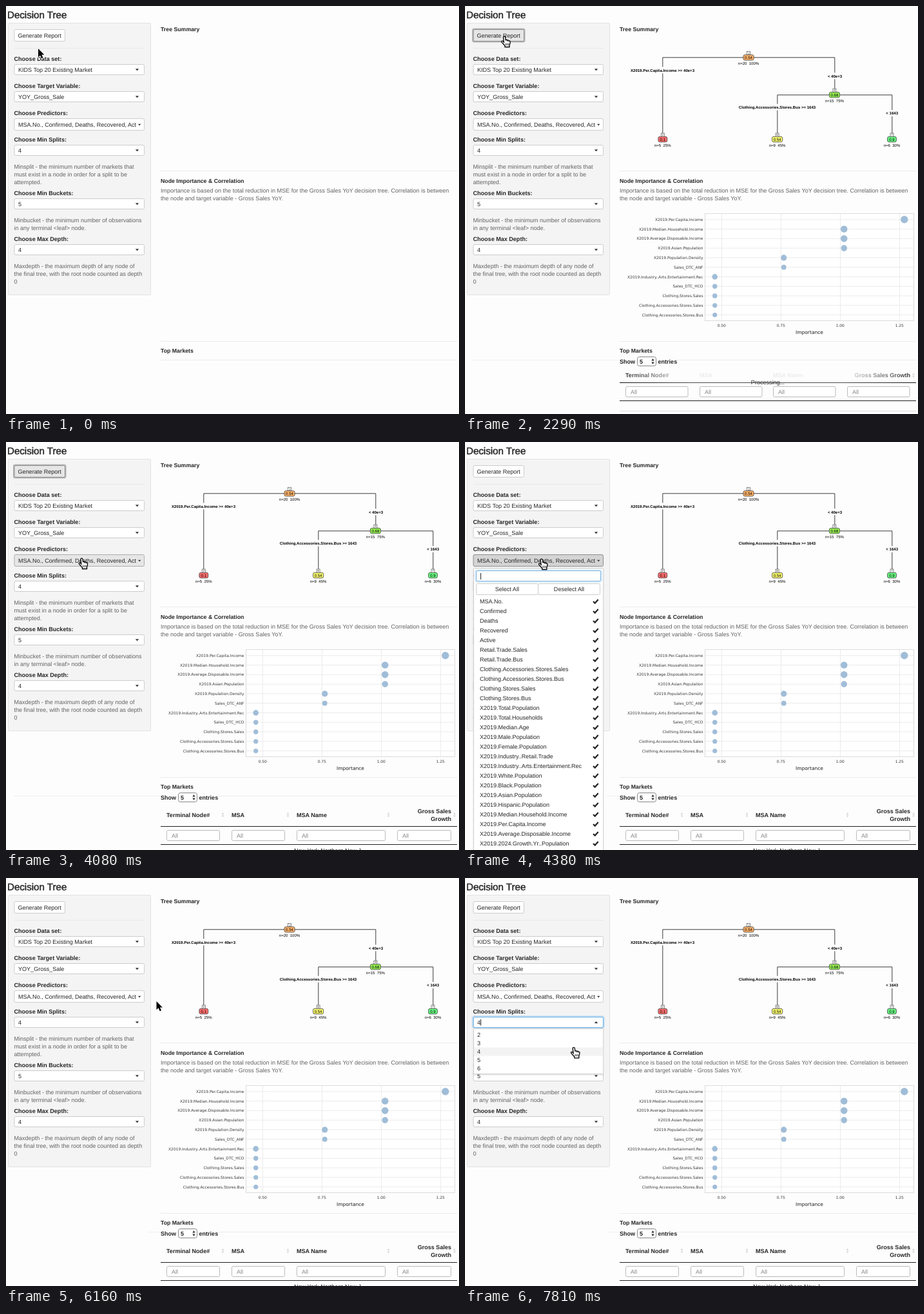
Recreate the animation shown at these times as an HTML page. Size 703 px wide and 632 px high, loop 8000 ms.

```html
<!DOCTYPE html>
<html lang="en">
<head>
<meta charset="utf-8">
<title>Decision Tree</title>
<style>
  html, body { margin: 0; width: 100%; height: 100%; overflow: hidden; background: #fdfdfd; }
  svg { display: block; position: absolute; left: 0; top: 0; }
  text { font: 9.05px "Liberation Sans", Arial, sans-serif; fill: #262626; white-space: pre; text-rendering: geometricPrecision; }
  .b { font-weight: bold; }
  .h { font-weight: bold; font-size: 8.75px; }
  .title { font-size: 15.1px; stroke: #262626; stroke-width: .45; }
  .help { fill: #636363; }
  .all { fill: #888; }
  .item { font-size: 9px; }
  .tree { font-size: 6.05px; fill: #000; }
  .cond { font-size: 6.05px; font-weight: bold; fill: #000; }
  .num { font-size: 4px; fill: #000; }
  .plot { font: 5.93px "DejaVu Sans", Verdana, sans-serif; fill: #3a3a3a; }
  .axis { font-size: 7.5px; fill: #1c1c1c; }
  .mid { text-anchor: middle; }
  .end { text-anchor: end; }
</style>
</head>
<body>
<svg id="stage" width="703" height="632" viewBox="0 0 703 632"></svg>
<script>
const text = (x, y, s, cls = '', extra = '') =>
  `<text x="${x}" y="${y}" class="${cls}" ${extra}>${s.replace(/&/g, '&amp;').replace(/</g, '&lt;')}</text>`;
const rect = (x, y, w, h, fill, stroke = 'none', rx = 0, extra = '') =>
  `<rect x="${x}" y="${y}" width="${w}" height="${h}" rx="${rx}" fill="${fill}" stroke="${stroke}" ${extra}/>`;
const path = (d, stroke, fill = 'none', extra = '') => `<path d="${d}" stroke="${stroke}" fill="${fill}" ${extra}/>`;
const line = (x, y, x2, color = '#ebebeb') => path(`M${x} ${y}H${x2}`, color);
const group = (id, ...parts) => `<g id="${id}">${parts.join('')}</g>`;
const each = (list, fn) => list.map(fn).join('');

const LEFT = 13, WIDTH = 201.5;
const caret = (x, y, w = 2.7) => path(`M${x - w} ${y}h${2 * w}l${-w} ${w * 1.1}z`, 'none', '#333');
const glow = (x, y, w, h) =>
  rect(x - 1, y - 1, w + 2, h + 2, 'none', '#66afe9', 3, 'stroke-width="3" opacity=".3"') +
  rect(x, y, w, h, 'none', '#66afe9', 2);
const popup = (y, h) => rect(LEFT - .5, y + .5, WIDTH + 1, h + 2, '#000', 'none', 2, 'opacity=".07"') +
  rect(LEFT + .3, y, WIDTH, h, '#fff', '#ccc', 1);

// Sidebar
const field = (label, y, value) =>
  text(12.5, y - 5.5, label, 'b') + rect(LEFT, y, WIDTH, 16, '#fff', '#ccc', 2) +
  text(19, y + 11.4, value);
const help = (y, ...rows) => each(rows, (s, i) => text(12.5, y + i * 12, s, 'help'));

const sidebar = [
  text(2, 19, 'Decision Tree', 'title'),
  rect(3.5, 26.5, 221, 421, '#f4f4f4', '#e2e2e2', 1),
  rect(LEFT - 1, 35.5, 80.5, 20, 'none', '#b5b5b5', 2, 'id="ring" stroke-width="2"'),
  rect(LEFT, 36.5, 78.5, 18, '#fff', '#ccc', 2, 'id="report"'),
  text(18.5, 49.2, 'Generate Report'),
  line(13, 65.5, 215, '#e9e9e9'),
  field('Choose Data set:', 90.5, 'KIDS Top 20 Existing Market'), caret(203.5, 97.2),
  field('Choose Target Variable:', 132.5, 'YOY_Gross_Sale'), caret(203.5, 139.2),
  text(12.5, 169, 'Choose Predictors:', 'b'),
  rect(LEFT, 174.5, WIDTH, 18, '#fff', '#ccc', 2, 'id="picker"'),
  text(19, 187, 'MSA.No., Confirmed, Deaths, Recovered, Act'), caret(207.2, 182.8, 2.2),
  field('Choose Min Splits:', 215.5, '4'), group('splitArrow', caret(203.5, 222.2)),
  help(252, 'Minsplit - the minimum number of markets that', 'must exist in a node in order for a split to be', 'attempted.'),
  field('Choose Min Buckets:', 298.5, '5'), caret(203.5, 305.2),
  help(335, 'Minbucket - the minimum number of observations', 'in any terminal <leaf> node.'),
  field('Choose Max Depth:', 369.5, '4'), caret(203.5, 376.2),
  help(406, 'Maxdepth - the maximum depth of any node of', 'the final tree, with the root node counted as depth', '0'),
].join('');

const headings = [
  text(240, 39, 'Tree Summary', 'h'),
  line(240, 255.5, 700),
  text(240, 274, 'Node Importance & Correlation', 'h'),
  text(240, 289, 'Importance is based on the total reduction in MSE for the Gross Sales YoY decision tree. Correlation is between', 'help'),
  text(240, 301, 'the node and target variable - Gross Sales YoY.', 'help'),
  line(240, 519.5, 700),
  text(240, 537, 'Top Markets', 'h'),
  line(240, 548.5, 700),
].join('');

// Tree
const node = (x, y, id, value, count, fill) => {
  const w = 7 + value.length * 2.3;
  return rect(x - 2.5, y - 9.5, 5, 5.5, '#fff', '#555', 0, 'stroke-width=".7"') + text(x, y - 5.3, id, 'num mid') +
    rect(x - w / 2, y - 4.2, w, 8.4, fill, '#444', 2.5, 'stroke-width=".8"') +
    text(x, y + 2.2, value, 'tree mid') + text(x, y + 11.5, count, 'tree mid');
};
const cond = (x, y, w, s) => rect(x - w / 2, y - 5, w, 10, '#fdfdfd') + text(x, y + 2.2, s, 'cond mid');

const tree = [
  path('M306.8 203V79.8H573.8V137.8M484.8 203V137.8H662.8V203', '#3c3c3c'),
  cond(306.5, 99.3, 100, 'X2019.Per.Capita.Income >= 40e+3'),
  cond(574, 108.3, 24, '< 40e+3'),
  cond(484.5, 156.7, 120, 'Clothing.Accessories.Stores.Bus >= 1643'),
  cond(662.7, 166, 21, '< 1643'),
  node(440, 79.8, '1', '0.54', 'n=20  100%', '#fbb26a'),
  node(573.4, 137.6, '3', '0.68', 'n=15  75%', '#94ee52'),
  node(306.8, 206.5, '2', '0.1', 'n=5  25%', '#f76c6c'),
  node(484.6, 206.5, '6', '0.54', 'n=9  45%', '#f5f56c'),
  node(662.5, 206.5, '7', '0.9', 'n=6  30%', '#66f580'),
].join('');

// Importance chart: name, x, radius
const bars = [
  ['X2019.Per.Capita.Income', 681.8, 5.7], ['X2019.Median.Household.Income', 588.2, 5.3],
  ['X2019.Average.Disposable.Income', 588.2, 5.3], ['X2019.Asian.Population', 588.2, 4.8],
  ['X2019.Population.Density', 494.7, 4.6], ['Sales_DTC_ANF', 494.7, 3.9],
  ['X2019.Industry..Arts.Entertainment.Rec', 387.7, 4.3], ['Sales_DTC_HCO', 387.7, 3.7],
  ['Clothing.Stores.Sales', 387.7, 3.7], ['Clothing.Accessories.Stores.Sales', 387.7, 3.6],
  ['Clothing.Accessories.Stores.Bus', 387.7, 3.6],
];
const rowY = i => 330.8 + i * 14.77;
const chart = [
  rect(372.5, 321.5, 324, 166, '#fff', 'none'),
  each(['0.50', '0.75', '1.00', '1.25'], (s, i) =>
    path(`M${398.5 + i * 92} 322V487`, '#ebebeb') + text(398.3 + i * 92, 497, s, 'plot mid')),
  each(bars, ([s, x, r], i) => line(373, rowY(i), 696) + text(369.5, rowY(i) + 2.1, s, 'plot end') +
    `<circle cx="${x}" cy="${rowY(i)}" r="${r}" fill="#a0bdd8"/>`),
  rect(372.5, 321.5, 324, 166, 'none', '#dcdcdc'),
  text(534.5, 507.5, 'Importance', 'plot axis mid'),
].join('');

// Market table
const filter = (x, y, w) => rect(x + .5, y, w, 16, '#fff', '#bbb', 2) + text(x + 8, y + 11.5, 'All', 'all');
const sorter = (x, y) => path(`M${x - 1.8} ${y - .7}l1.8 -3l1.8 3zM${x - 1.8} ${y + .7}l1.8 3l1.8 -3z`, 'none', '#d2d2d2');

const lengthMenu = [
  rect(240, 543, 90, 14, '#fdfdfd'),
  text(240, 553.5, 'Show', 'b'),
  rect(267.5, 543.5, 29, 14, '#fff', '#888', 3),
  text(271, 553.7, '5', 'b'),
  path('M289.3 549.6l2.2 -3.6l2.2 3.6zM289.3 551.4l2.2 3.6l2.2 -3.6z', 'none', '#333'),
  text(299.5, 553.5, 'entries', 'b'),
].join('');

const loading = group('loading',
  text(249, 575, 'Terminal Node#', 'b'), text(364, 575, 'MSA', 'b'),
  text(478, 575, 'MSA Name', 'b'), text(691, 575, 'Gross Sales Growth', 'b end'), sorter(696, 572),
  rect(240, 563, 460, 26, 'url(#veil)'),
  line(240, 583.5, 700, 'url(#fade)'),
  text(470, 586, 'Processing...', 'mid'),
  each([249, 364, 478, 593], x => filter(x, 589.5, 96.5)),
  line(240, 611.5, 700, '#222'), line(240, 627.5, 700, '#ddd'));

const loaded = group('loaded',
  text(249, 581, 'Terminal Node#', 'b'), text(350, 581, 'MSA', 'b'), text(451, 581, 'MSA Name', 'b'),
  text(691, 575, 'Gross Sales', 'b end'), text(691, 587, 'Growth', 'b end'),
  each([336.5, 437.5, 593.5, 696], x => sorter(x, 577.5)),
  line(240, 595.5, 700, '#222'),
  each([[249, 82], [350, 82], [451, 137], [607, 83]], ([x, w]) => filter(x, 601.5, w)),
  line(240, 623.5, 700, '#222'),
  text(447, 636, 'New York-Northern New J'));

// Predictor menu
const predictors = ['MSA.No.', 'Confirmed', 'Deaths', 'Recovered', 'Active', 'Retail.Trade.Sales', 'Retail.Trade.Bus',
  'Clothing.Accessories.Stores.Sales', 'Clothing.Accessories.Stores.Bus', 'Clothing.Stores.Sales', 'Clothing.Stores.Bus',
  ...['Total.Population', 'Total.Households', 'Median.Age', 'Male.Population', 'Female.Population',
    'Industry..Retail.Trade', 'Industry..Arts.Entertainment.Rec', 'White.Population', 'Black.Population',
    'Asian.Population', 'Hispanic.Population', 'Median.Household.Income', 'Per.Capita.Income',
    'Average.Disposable.Income', '2024.Growth.Yr..Population'].map(s => 'X2019.' + s)];

const menu = group('menu',
  popup(195.5, 450),
  rect(17.5, 199.5, 193, 16, '#fff', '#ccc', 2),
  group('searchGlow', glow(17.5, 199.5, 193, 16)),
  path('M24.5 203V213', '#222', 'none', 'id="searchCaret"'),
  rect(17.5, 219.5, 96, 17, '#fff', '#ccc', 2), rect(113.5, 219.5, 96, 17, '#fff', '#ccc', 2),
  text(65.3, 231, 'Select All', 'mid'), text(161.5, 231, 'Deselect All', 'mid'),
  each(predictors, (s, i) => text(23, 250.2 + i * 15, s, 'item') +
    path(`M199 ${247 + i * 15}l2.7 2.6l5 -5.6`, '#262626', 'none', 'stroke-width="2.2"')));

// Min-splits menu
const splits = group('splits',
  rect(LEFT, 215.5, WIDTH, 16, '#fff'), glow(LEFT, 215.5, WIDTH, 16),
  text(19, 226.9, '4'), path('M24.5 219V228.5', '#222'),
  path('M200.8 225h5.4l-2.7 -3z', 'none', '#333'),
  popup(233.5, 70),
  rect(LEFT + .8, 0, WIDTH - 1, 13, '#f3f3f3', 'none', 0, 'id="option"'),
  each(['2', '3', '4', '5', '6'], (s, i) => text(19, 246.2 + i * 13, s)));

// Pointers, each with its hot spot at the origin
const pointers = group('pointer',
  group('arrow', path('M0 0V13.2L3 10.4L5.2 15.3L7.5 14.3L5.4 9.6H9.4Z', '#fff', '#000', 'stroke-width="1.4" paint-order="stroke"')),
  group('hand',
    path('M-1.6 1.2C-1.5 -.6 1.3 -.6 1.5 1.2L2.1 6C2.6 4.6 4.5 4.8 4.7 6.3C5.3 5.2 6.9 5.6 7 7C8 6.2 9.2 6.8 9.1 8.2C9.1 11 8.4 12 8 13.5V16.3H1V14.5C-.6 12.5 -2.6 10.5 -4.1 8.6C-4.8 7.4 -3.4 6.3 -2.1 7.3L-.7 8.8Z', '#000', '#fff', 'stroke-width="1.3"'),
    path('M2.2 10.5V13.8M4.3 10.5V13.8M6.4 10.5V13.8', '#000', 'none', 'stroke-width=".8"')),
  group('beam', path('M-3 -7Q0 -7 0 -5Q0 -7 3 -7M0 -5V5M-3 7Q0 7 0 5Q0 7 3 7M-1.5 2H1.5', '#111', 'none', 'stroke-width="1.3"')));

const stops = (color, a, b) => each([[0, a], [.25, b], [.75, b], [1, a]],
  ([o, op]) => `<stop offset="${o}" stop-color="${color}" stop-opacity="${op}"/>`);
const grad = (id, ...s) =>
  `<linearGradient id="${id}" gradientUnits="userSpaceOnUse" x1="240" y1="0" x2="700" y2="0">${stops(...s)}</linearGradient>`;

const stage = document.getElementById('stage');
stage.innerHTML = `<defs>${grad('veil', '#fdfdfd', 0, .92)}${grad('fade', '#111', 1, .75)}</defs>` +
  rect(0, 0, 703, 632, '#fdfdfd') + sidebar + headings +
  group('results', tree, chart, lengthMenu, loading, loaded) +
  path('', '#f0f0f0', 'none', 'id="rule"') +
  splits + menu + pointers;

const el = {};
stage.querySelectorAll('[id]').forEach(e => el[e.id] = e);
const show = (id, on) => el[id].style.display = on ? '' : 'none';
const paint = (id, fill, stroke) => {
  el[id].setAttribute('fill', fill);
  el[id].setAttribute('stroke', stroke);
};

// The pointer is sampled every STEP ms: start, samples, destination
const STEP = 148.5, LOOP = 8000;
const moves = [[500, 5, 61, 47.2], [3340, 6, 117.5, 180.2], [4230, 1, 118.8, 181.2],
  [4830, 7, 240, 185], [6160, 4, 198.5, 223], [7360, 4, 168.8, 262.5]];
const ease = p => p * p * (3 - 2 * p);

function pointerAt(t) {
  let x = 50, y = 66;
  for (const [at, n, toX, toY] of moves) {
    if (t < at) break;
    const p = ease(Math.min(1, (Math.floor((t - at + 2) / STEP) + 1) / n));
    x += (toX - x) * p;
    y += (toY - y) * p;
  }
  return [x, y];
}

function render(t) {
  const [x, y] = pointerAt(t);
  const within = (x0, y0, x1, y1) => x >= x0 && x <= x1 && y >= y0 && y <= y1;
  const onReport = within(12, 36, 92, 55), onPicker = within(12, 174, 215, 193);
  const onField = [90, 132, 215].some(top => within(12, top, 215, top + 17));
  const menuOpen = t >= 4380 && t < 5870, splitsOpen = t >= 6610;
  const onOptions = splitsOpen && within(13, 234, 215, 304);
  const focused = t >= 1240 && t < 4230;

  show('ring', focused);
  paint('report', focused || onReport ? '#e6e6e6' : '#fff', focused ? '#8c8c8c' : onReport ? '#adadad' : '#ccc');
  const pressed = t >= 4230 && t < 5870;
  paint('picker', pressed ? (onPicker ? '#d4d4d4' : '#e0e0e0') : onPicker ? '#e6e6e6' : '#fff',
    pressed ? '#8c8c8c' : onPicker ? '#adadad' : '#ccc');

  show('results', t >= 2290);
  show('loading', t < 2440);
  show('loaded', t >= 2440);
  show('rule', t >= 2290);
  el.rule.setAttribute('d', `M${t < 4380 ? 12 : 220} 548.5H240`);

  show('menu', menuOpen);
  show('searchGlow', t < 5720);
  el.searchGlow.style.opacity = t < 4530 ? .75 : 1;
  show('searchCaret', t < 5720 && Math.floor((t - 4380) / 500) % 2 === 0);

  show('splits', splitsOpen);
  show('splitArrow', !splitsOpen);
  const row = onOptions && y >= 236.5 ? Math.floor((y - 236.5) / 13) : 2;
  el.option.setAttribute('y', 236.5 + row * 13);

  const beam = splitsOpen && within(12, 215, 215, 232);
  const hand = !beam && (onReport || onPicker || onField || onOptions);
  show('beam', beam);
  show('hand', hand);
  show('arrow', !beam && !hand);
  el.pointer.setAttribute('transform', `translate(${x} ${y})`);
}

function tick() {
  render(performance.now() % LOOP);
  requestAnimationFrame(tick);
}
tick();
</script>
</body>
</html>
```
